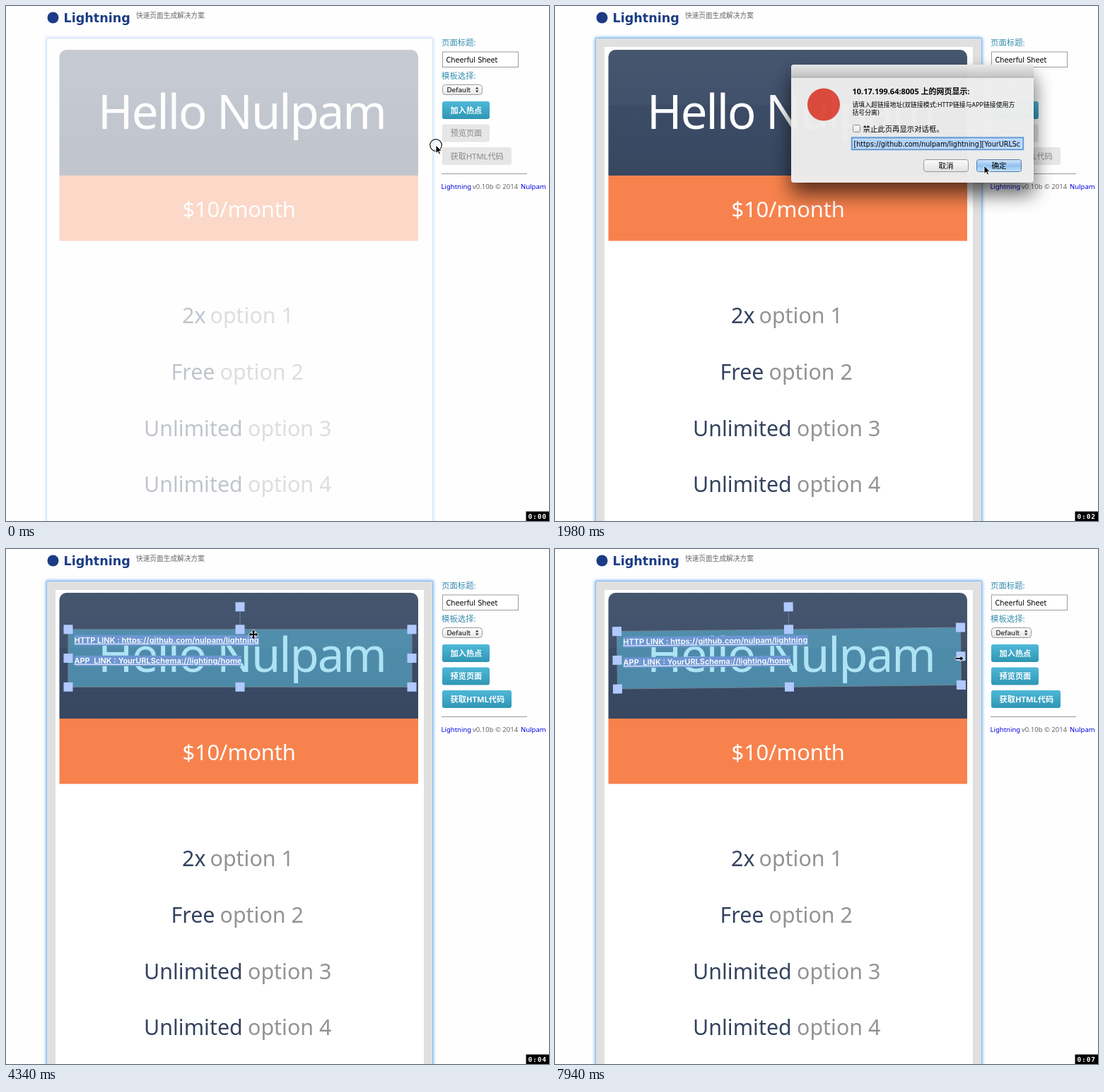
Animation of 768x729 px, one loop 8000 ms. Source, as an HTML page:

```html
<!DOCTYPE html>
<html lang="zh">
<head>
<meta charset="utf-8">
<title>Lightning</title>
<style>
html, body { margin: 0; width: 100%; height: 100%; overflow: hidden; background: #fefefe; }
svg { display: block; }
text { font-family: "Noto Sans", "Noto Sans CJK SC", sans-serif; white-space: pre; }
.ui { font-family: "DejaVu Sans", sans-serif; font-size: 9.8px; }
.label { font-size: 11.4px; fill: #3a8fb0; }
.foot { font-family: Inter, sans-serif; font-size: 9.5px; fill: #666; }
.foot .link { fill: #0000e0; }
.item { font-size: 30.4px; fill: #939395; }
.item .strong { fill: #34435f; }
.btn rect { fill: url(#teal); }
.btn text { font-size: 11.2px; font-weight: 700; fill: #fff; }
.off rect { fill: #e6e6e6; }
.off text { fill: #888; font-weight: 500; }
.focus rect { filter: drop-shadow(0 0 2px #4f9bea); }
#frame { filter: drop-shadow(0 0 2.5px #4c9ff0); }
#dialogBox { filter: drop-shadow(0 16px 14px rgba(0,0,0,.65)); }
#dialog { transform-origin: 505.5px 166.5px; }
.hot { font: 600 11px/15px Inter, sans-serif; color: #fff; white-space: pre; }
.hot span { position: absolute; left: 8.5px; background: #6d96d2; text-decoration: underline; }
#handles rect { width: 13px; height: 13px; }
</style>
</head>
<body>
<svg width="768" height="729" viewBox="0 0 768 729">
  <defs>
    <linearGradient id="navy" x2="0" y2="1"><stop stop-color="#46566f"/><stop offset=".44" stop-color="#41516b"/><stop offset=".44" stop-color="#3c4c66"/><stop offset="1" stop-color="#374760"/></linearGradient>
    <linearGradient id="teal" x2="0" y2="1"><stop stop-color="#4fb8d8"/><stop offset="1" stop-color="#2f96b4"/></linearGradient>
    <linearGradient id="pale" x2="0" y2="1"><stop stop-color="#fff"/><stop offset="1" stop-color="#e6e6e6"/></linearGradient>
    <linearGradient id="blue" x2="0" y2="1"><stop stop-color="#d3e6fa"/><stop offset=".5" stop-color="#8fc0f0"/><stop offset="1" stop-color="#bfe4fd"/></linearGradient>
    <linearGradient id="bar" x2="0" y2="1"><stop stop-color="#e9e9e9"/><stop offset="1" stop-color="#c3c3c3"/></linearGradient>
    <clipPath id="field"><rect x="420" y="186" width="241" height="18"/></clipPath>
  </defs>

  <circle cx="66.5" cy="16.5" r="8" fill="#1b3c85"/>
  <text x="81.500" y="23" font-weight="700" font-size="17.6" fill="#1b3c85" style="font-family:'DejaVu Sans',sans-serif">Lightning</text>
  <text x="184" y="17" font-size="9.7" fill="#666">快速页面生成解决方案</text>

  <rect id="frame" x="57.5" y="45.5" width="546" height="700" fill="#fff" stroke="#8dbcf0"/>
  <g id="mat">
    <rect x="58" y="46" width="545" height="690" fill="#e0e0e0"/>
    <rect x="70" y="58" width="521" height="680" fill="#fff"/>
  </g>
  <g id="art">
    <path d="M75.5 240V72a10 10 0 0 1 10-10H573a10 10 0 0 1 10 10V240Z" fill="url(#navy)"/>
    <rect x="75.5" y="240" width="507.5" height="92.5" fill="#f7824d"/>
    <g fill="#fff">
      <text x="130" y="174" font-size="67" letter-spacing="-2">Hello Nulpam</text>
      <text x="249.5" y="299" font-size="31" letter-spacing="-.2">$10/month</text>
    </g>
    <g class="item">
      <text class="strong" x="249" y="449">2x</text><text x="288.5" y="449">option 1</text>
      <text class="strong" x="233.5" y="529">Free</text><text x="302.5" y="529">option 2</text>
      <text class="strong" x="195" y="609">Unlimited</text><text x="342" y="609">option 3</text>
      <text class="strong" x="195" y="688">Unlimited</text><text x="342" y="688">option 4</text>
    </g>
  </g>

  <text class="label" x="616" y="56">页面标题:</text>
  <rect x="617.5" y="65" width="107" height="21.5" fill="#fff" stroke="#9b9b9b"/>
  <text class="ui" x="622.5" y="79.5">Cheerful Sheet</text>
  <text class="label" x="616" y="103">模板选择:</text>
  <rect x="617.5" y="111.5" width="56" height="14" rx="4" fill="url(#pale)" stroke="#9a9a9a"/>
  <text class="ui" x="623.5" y="122" style="font-size:9.2px">Default</text>
  <path d="M664 117.5l2.2-3 2.2 3zM664 119.5l2.2 3 2.2-3z" fill="#333"/>
  <g class="btn" id="add"><rect x="617" y="135" width="67" height="25" rx="3"/><text x="628.5" y="151.5">加入热点</text></g>
  <g class="btn later"><rect x="617" y="167.5" width="67" height="25" rx="3"/><text x="628.5" y="184">预览页面</text></g>
  <g class="btn later"><rect x="617" y="200" width="98" height="25" rx="3"/><text x="628.5" y="216.5">获取HTML代码</text></g>
  <path d="M616 237.5h121" stroke="#999"/>
  <g class="foot">
    <text class="link" x="615.5" y="258.5">Lightning</text>
    <text x="660" y="258.5">v0.10b © 2014</text>
    <text class="link" x="728" y="258.5">Nulpam</text>
  </g>

  <g id="hotspot">
    <rect width="486" height="81.5" fill="rgba(96,200,235,.51)"/>
    <foreignObject width="486" height="82">
      <div class="hot"><span style="top:8px">HTTP LINK : https://github.com/nulpam/lightning</span><span style="top:37px">APP  LINK : YourURLSchema://lighting/home</span></div>
    </foreignObject>
    <g id="handles">
      <path d="M0 0H486V81.5H0ZM243 0V-32" fill="none" stroke="#6f8290"/>
    </g>
  </g>

  <g id="dialog">
    <rect id="dialogBox" x="334" y="83" width="343" height="167" rx="4" fill="#ededed"/>
    <path d="M334 101V87a4 4 0 0 1 4-4H673a4 4 0 0 1 4 4V101Z" fill="url(#bar)"/>
    <path d="M334 101H677" stroke="#a2a2a2"/>
    <circle cx="380" cy="139.5" r="23" fill="#dd4a3c"/>
    <text x="420.5" y="125" font-size="11" font-weight="700" style="font-family:'Open Sans','Noto Sans CJK SC',sans-serif">10.17.199.64:8005 上的网页显示:</text>
    <g font-size="8.9">
      <text x="420.5" y="142.5">请填入超链接地址(双链接模式:HTTP链接与APP链接使用方</text>
      <text x="420.5" y="154">括号分离)</text>
    </g>
    <rect x="421.5" y="168.5" width="10" height="10" rx="2" fill="url(#pale)" stroke="#8c8c8c"/>
    <text x="435.5" y="177.5" font-size="10.4" font-weight="500">禁止此页再显示对话框。</text>
    <rect x="420" y="186.5" width="242" height="16.5" fill="#fff" stroke="#69a2dd" stroke-width="2.5"/>
    <rect x="422" y="188.5" width="238" height="12.5" fill="#b4d5fe"/>
    <text class="ui" x="422.5" y="198.5" clip-path="url(#field)" style="font-size:9.6px">[https://github.com/nulpam/lightning][YourURLSc</text>
    <rect x="521.5" y="217.5" width="63" height="17" rx="3" fill="url(#pale)" stroke="#999"/>
    <rect x="596.5" y="217.5" width="63" height="17" rx="3" fill="url(#blue)" stroke="#5a78a8"/>
    <g font-size="10.6" text-anchor="middle"><text x="553" y="230">取消</text><text x="628" y="230">确定</text></g>
  </g>

  <g id="cursor">
    <circle id="ring" r="8.3" fill="rgba(255,255,255,.35)" stroke="#111" stroke-width="1.2"/>
    <path class="arrow" d="M0 0V11.5L2.7 9 4.6 13 6.5 12.1 4.7 8.3H8.2Z" fill="#000" stroke="#fff" stroke-width=".9"/>
    <path class="ibeam" d="M-2.5-5.5Q0-5.5 0-4Q0-5.5 2.5-5.5M0-4V4M-2.5 5.5Q0 5.5 0 4Q0 5.5 2.5 5.5" fill="none" stroke="#111"/>
    <path class="move" d="M0-6.5L2.5-3.5H1V-1H3.5V-2.5L6.5 0 3.5 2.5V1H1V3.5H2.5L0 6.5-2.5 3.5H-1V1H-3.5V2.5L-6.5 0-3.5-2.5V-1H-1V-3.5H-2.5Z" stroke="#fff" stroke-width="1.2" paint-order="stroke"/>
    <g class="cross" fill="none"><path d="M-6 0H6M0-6V6" stroke="#fff" stroke-width="2.6"/><path d="M-6 0H6M0-6V6" stroke="#111" stroke-width="1.3"/></g>
    <path class="east" d="M-5.5-.9H1.5V-3.3L5.5 0 1.5 3.3V.9H-5.5Z" stroke="#fff" stroke-width="1.2" paint-order="stroke"/>
  </g>

  <rect x="735.5" y="715.5" width="33" height="14"/>
  <text id="clock" x="738.5" y="725.5" fill="#fff" font-size="9.5" font-weight="700" letter-spacing=".9" style="font-family:'DejaVu Sans Mono',monospace"></text>
</svg>
<script>
const LOOP = 8000;
const $ = id => document.getElementById(id);

const ticks = [0, 210, 420, 520, 730, 940, 1150, 1360, 1570, 1770, 1980, 2080, 2280, 2490, 2690, 2900, 3100,
  3410, 3620, 3820, 4030, 4130, 4340, 4540, 4750, 4960, 5160, 5260, 5460, 5880, 6090, 6180, 6390, 6600, 6800,
  7220, 7430, 7640, 7850, 7940];

// time, x, y, shape, pressed
const pointer = [
  [0, 608, 197, 'arrow', 1], [210, 608, 197, 'arrow'],
  [730, 646, 142, 'ibeam'], [940, 646, 142, 'ibeam', 1], [1150, 646, 142, 'arrow'],
  [1980, 607, 226, 'arrow'], [2080, 607, 226, 'arrow', 1], [2280, 607, 226, 'arrow'],
  [2690, 355, 134, 'move'], [2900, 355, 134, 'move', 1], [3100, 356, 172, 'move'], [3410, 356, 172, 'move'],
  [4340, 350, 121, 'move'], [5160, 331, 88, 'cross'], [5880, 331, 83, 'cross', 1],
  [6390, 324, 79, 'cross', 1], [6800, 330, 82, 'cross'], [7220, 330, 82, 'arrow'], [7850, 572, 155, 'east']
];
const fade = [[0, .3], [520, 1]];
const drag = [[2900, 0], [3100, 1]];
const turn = [[5880, 0], [6390, -6.26], [6800, -.65]];
const zoom = [[940, .59], [1150, 1]];

function sample(track, t, col = 1) {
  const i = track.findIndex(key => key[0] > t);
  if (i === 0) return track[0][col];
  if (i < 0) return track[track.length - 1][col];
  const a = track[i - 1], b = track[i];
  return a[col] + (b[col] - a[col]) * (t - a[0]) / (b[0] - a[0]);
}

const within = (t, from, to = LOOP) => t >= from && t < to;
const show = (el, on) => { el.style.display = on ? '' : 'none'; };

const spots = [[243, -32]];
for (const x of [0, 243, 486]) for (const y of [0, 40.75, 81.5]) if (x !== 243 || y !== 40.75) spots.push([x, y]);
for (const [x, y] of spots) {
  const square = document.createElementNS('http://www.w3.org/2000/svg', 'rect');
  square.setAttribute('x', x - 6.5);
  square.setAttribute('y', y - 6.5);
  $('handles').append(square);
}

const shapes = [...$('cursor').children].slice(1);
const later = [...document.querySelectorAll('.later')];

function draw(t) {
  const strength = sample(fade, t);
  $('art').style.opacity = strength;
  $('mat').style.opacity = (strength - .3) / .7;
  $('frame').style.opacity = .1 + strength * .9;

  const linked = t >= 2280;
  later.forEach(button => button.classList.toggle('off', !linked));
  $('add').classList.toggle('focus', within(t, 2280, 2900));

  show($('dialog'), within(t, 940, 2280));
  const scale = sample(zoom, t);
  $('dialog').style.transform = `scale(${scale})`;
  $('dialog').style.opacity = scale < 1 ? .6 : .98;

  show($('hotspot'), linked);
  const moved = sample(drag, t);
  $('hotspot').setAttribute('transform',
    `translate(${87.3 + moved * .7} ${75.8 + moved * 38}) rotate(${sample(turn, t)} 243 40.75)`);
  show($('handles'), t >= 3100);
  $('handles').setAttribute('fill', within(t, 5880, 7220) ? '#dfe7fd' : '#b0c9fe');

  const [, , , shape, pressed] = pointer.filter(key => key[0] <= t).pop();
  $('cursor').setAttribute('transform', `translate(${sample(pointer, t)} ${sample(pointer, t, 2)})`);
  shapes.forEach(el => show(el, el.classList.contains(shape)));
  show($('ring'), pressed);

  $('clock').textContent = '0:0' + Math.min(7, Math.floor((t + 90) / 1000));
}

function frame() {
  const now = performance.now() % LOOP;
  draw(ticks.filter(tick => tick <= now).pop());
  requestAnimationFrame(frame);
}
frame();
</script>
</body>
</html>
```
